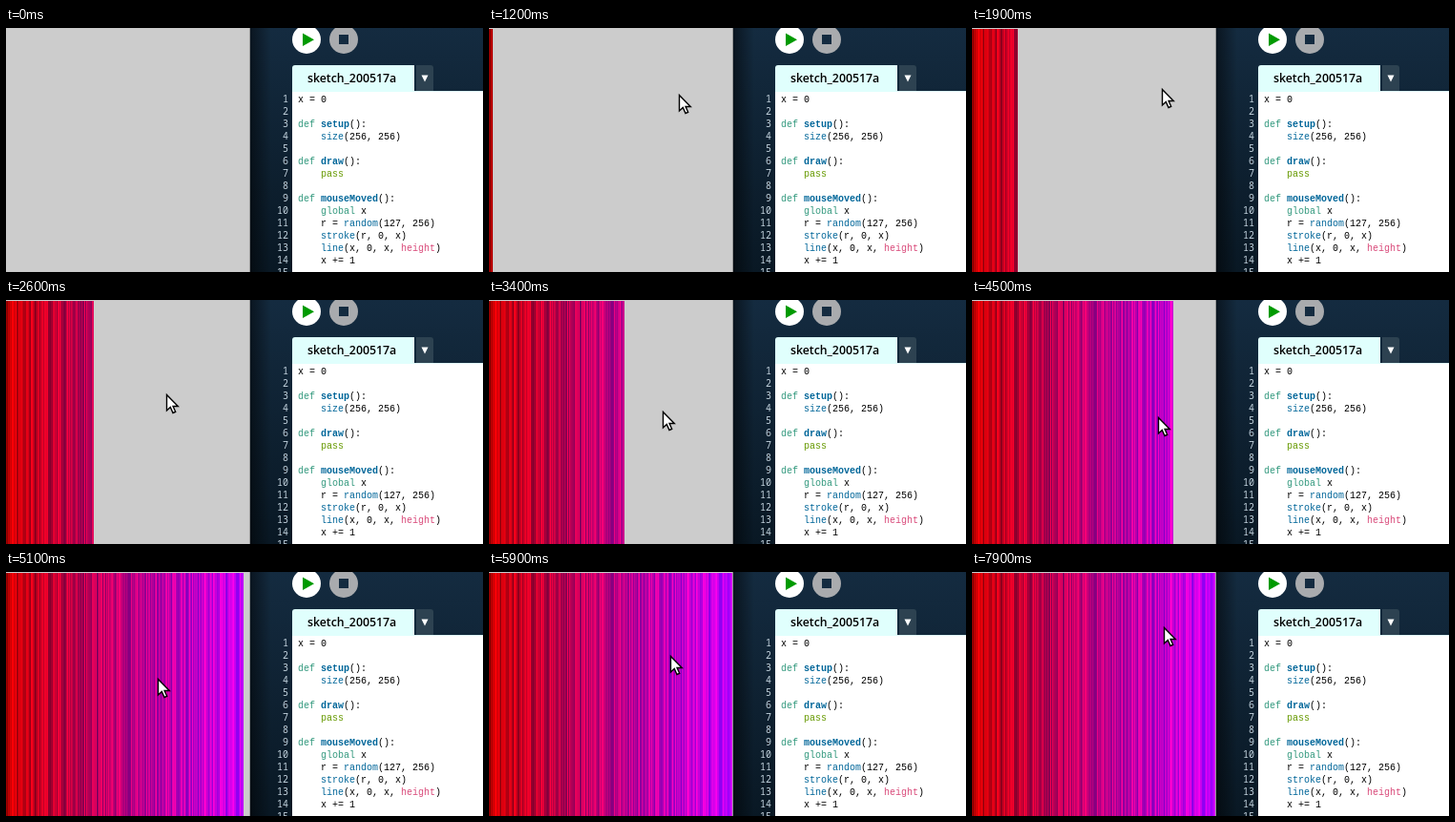
Animation of 500x256 px, one loop 8000 ms. Source, as an HTML page with a canvas:

```html
<!DOCTYPE html>
<html lang="en">
<head>
<meta charset="utf-8">
<title>Mouse stripes sketch</title>
<style>
  html, body { margin: 0; width: 500px; height: 256px; overflow: hidden; background: #ccc; }
  svg, canvas { position: absolute; left: 0; top: 0; }
  .code text { font: 10px "Liberation Mono", monospace; white-space: pre; }
  .code .num { font-family: "Noto Sans Mono", monospace; fill: #c4d4df; text-anchor: end; }
  .tab { font: 600 12.3px "Open Sans", "Noto Sans", sans-serif; }
  .key { fill: #33997e; }
  .fn { fill: #006699; }
  .name { fill: #006699; font-weight: bold; }
  .pass { fill: #669900; }
  .var { fill: #d94a7a; }
</style>
</head>
<body>
<svg width="500" height="256">
  <defs>
    <linearGradient id="navy" x2="0" y2="1">
      <stop stop-color="#142b40"/><stop offset="1" stop-color="#091824"/>
    </linearGradient>
    <linearGradient id="shade">
      <stop stop-color="#000" stop-opacity=".5"/><stop offset="1" stop-opacity="0"/>
    </linearGradient>
  </defs>
  <path fill="#999" d="M255 0h1v256h-1z"/>
  <path fill="url(#navy)" d="M256 0h244v256h-244z"/>
  <path fill="url(#shade)" d="M256 0h22v256h-22z"/>
  <circle cx="315" cy="12" r="15" fill="#fff"/>
  <path fill="#009a00" d="M311 5.500l12 6.700-12 6.700z"/>
  <circle cx="354" cy="12" r="15" fill="#a9abae"/>
  <path fill="#142b40" d="M349 7h10v10h-10z"/>
  <path fill="#2d4251" d="M430 39h15q3 0 3 3v24h-18z"/>
  <path fill="#fff" d="M435.500 49.500h7l-3.500 7z"/>
  <path fill="#fff" d="M300 66h200v190h-200z"/>
  <path fill="#e0fffd" d="M300 67V42q0-3 3-3h125v27h72v1z"/>
  <text class="tab" x="316" y="57">sketch_200517a</text>
  <g class="code" id="code"></g>
</svg>
<canvas id="stage" width="500" height="256"></canvas>
<script>
// Markup: {class|text}
const source = `x = 0

{key|def} {name|setup}():
    {fn|size}(256, 256)

{key|def} {name|draw}():
    {pass|pass}

{key|def} {name|mouseMoved}():
    {key|global} x
    r = {fn|random}(127, 256)
    {fn|stroke}(r, 0, x)
    {fn|line}(x, 0, x, {var|height})
    x += 1
`;
document.getElementById('code').innerHTML = source.split('\n').map((line, i) => {
  const y = 78 + 13 * i;
  const body = line.replace(/\{(\w+)\|(\w+)\}/g, '<tspan class="$1">$2</tspan>');
  return `<text class="num" x="296" y="${y}">${i + 1}</text><text x="306" y="${y}">${body}</text>`;
}).join('');

const ctx = document.getElementById('stage').getContext('2d');
const arrow = new Path2D('M.5 .5V17L4.300 13.500L7 19.500L9.700 18.300L7.100 12.500H12.300Z');

// Pointer stops: arrival time in ms, place of the tip
const stops = [
  [500, 298, 20], [1300, 195, 72], [1900, 199, 64], [2600, 168, 99], [3400, 182, 117],
  [4200, 149, 128], [4500, 195, 123], [5000, 159, 112], [5900, 190, 88],
  [7500, 166, 233], [7900, 201, 58]
];
const longestMove = 800;  // later stops are reached by a quick flick after a rest
const flick = 300;

let seed = 20;
const random = (lo, hi) => {
  seed = (seed * 1664525 + 1013904223) % 4294967296;
  return lo + (hi - lo) * seed / 4294967296;
};
const stripes = Array.from({ length: 255 }, (_, x) => `rgb(${random(127, 256) | 0},0,${x})`);

function pointer(t) {
  const i = stops.findIndex(stop => stop[0] >= t);
  const [end, x, y] = stops[i];
  const [start, x0, y0] = stops[Math.max(i - 1, 0)];
  const span = Math.min(end - start, end > 7000 ? flick : longestMove) || 1;
  const p = Math.max(0, 1 - (end - t) / span);
  const ease = (1 - Math.cos(Math.PI * p)) / 2;
  return [x0 + (x - x0) * ease, y0 + (y - y0) * ease].map(Math.round);
}

function draw() {
  const t = Math.floor(performance.now() % 8000 / 100) * 100;
  ctx.clearRect(0, 0, 500, 256);
  // The moving mouse adds stripes at a steady rate
  const count = Math.round((t - 1134) * 0.0627);
  stripes.slice(0, Math.max(0, count)).forEach((color, x) => {
    ctx.fillStyle = color;
    ctx.fillRect(x, 1, 1, 255);
  });
  if (t >= 500) {
    ctx.save();
    ctx.translate(...pointer(t));
    ctx.fillStyle = '#fff';
    ctx.lineWidth = 1.4;
    ctx.fill(arrow);
    ctx.stroke(arrow);
    ctx.restore();
  }
  requestAnimationFrame(draw);
}
draw();
</script>
</body>
</html>
```
